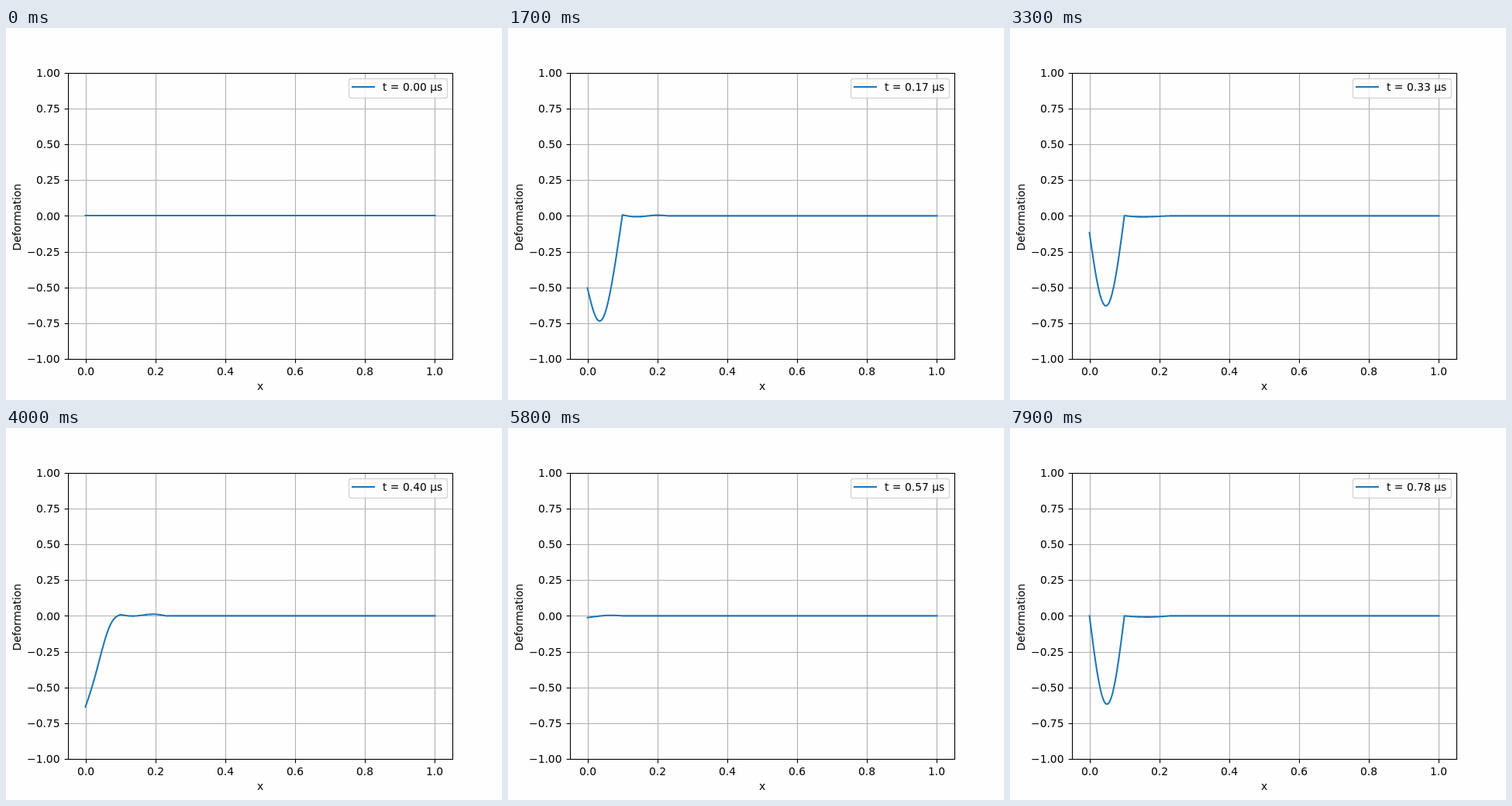
An HTML page with a canvas that plays this animation: 640 by 480 pixels, repeating every 8000 ms.

```html
<!DOCTYPE html>
<html lang="en">
<head>
<meta charset="utf-8">
<title>Deformation over time</title>
<style>
html, body { margin: 0; width: 100%; height: 100%; overflow: hidden; background: #fefefe; }
canvas { display: block; }
</style>
</head>
<body>
<canvas id="plot" width="640" height="480"></canvas>
<script>
const ctx = document.getElementById('plot').getContext('2d');
const STEP_MS = 100, STEPS = 80, STEP_US = 0.00989;
const BLUE = '#1f77b4', GRID = '#b0b0b0', INK = '#000', PAPER = '#fefefe';
const LEFT = 80, RIGHT = 576, TOP = 57.6, BOTTOM = 427.2;
const FONT = '13.89px "DejaVu Sans", Verdana, sans-serif';
const LAYER_1 = 0.1, LAYER_2 = 0.23;

const px = x => 102.545 + 450.91 * x;
const py = y => 242.4 - 184.8 * y;
const crisp = v => Math.floor(v + 0.5) + 0.5;
const rad = deg => deg * Math.PI / 180;

// A steady standing wave plus a transient that swings the free end and dies out.
function shapeAt(n) {
  const fade = (1 - Math.exp(-n / 8)) / (1 + Math.exp((n - 48) / 2.5));
  const swing = rad(60.3 * n);
  const end = 0.7 * fade * Math.sin(swing);
  const rise = 1 - Math.exp(-n / 3);
  const mode = 0.74 * rise * Math.sin(rad(40.2 * n + 7.8)) - 0.15 * fade * Math.cos(swing);
  const edge = -0.013 * end;

  return x => {
    if (x >= LAYER_2) return 0;
    if (x <= LAYER_1) {
      const q = x / LAYER_1, a = Math.PI * q;
      return end * (1 - q) + edge * q + mode * Math.sin(a) + 0.06 * end * Math.sin(2 * a);
    }
    const p = (x - LAYER_1) / (LAYER_2 - LAYER_1), a = Math.PI * p;
    return edge * (1 - p) + 0.013 * (mode * Math.sin(a) + end * Math.sin(2 * a));
  };
}

function line(x1, y1, x2, y2, color, width) {
  ctx.strokeStyle = color;
  ctx.lineWidth = width;
  ctx.beginPath();
  ctx.moveTo(x1, y1);
  ctx.lineTo(x2, y2);
  ctx.stroke();
}

// Text starts on whole pixels so that its glyphs stay sharp.
function text(str, x, y, align = 0) {
  const left = x - align * Math.round(ctx.measureText(str).width);
  ctx.fillStyle = INK;
  ctx.fillText(str, Math.round(left), Math.round(y));
}

function drawAxes() {
  ctx.lineCap = 'butt';
  for (let i = 0; i <= 5; i++) {
    const v = i / 5, x = crisp(px(v));
    line(x, 58, x, 427, GRID, 1.11);
    line(x, 427.5, x, 432.4, INK, 1.11);
    text(v.toFixed(1), px(v), 448, 0.5);
  }
  for (let i = -4; i <= 4; i++) {
    const v = i / 4, y = crisp(py(v));
    line(80, y, 576, y, GRID, 1.11);
    line(75.6, y, 80.5, y, INK, 1.11);
    text((v < 0 ? '\u2212' : '') + Math.abs(v).toFixed(2), 70.3, py(v) + 5.2, 1);
  }
  text('x', 328, 467, 0.5);
  ctx.save();
  ctx.translate(19, 244.5);
  ctx.rotate(-Math.PI / 2);
  text('Deformation', 0, 0, 0.5);
  ctx.restore();
}

function drawCurve(n) {
  const shape = shapeAt(n);
  ctx.save();
  ctx.beginPath();
  ctx.rect(LEFT, TOP, RIGHT - LEFT, BOTTOM - TOP);
  ctx.clip();
  ctx.strokeStyle = BLUE;
  ctx.lineWidth = 2.08;
  ctx.lineCap = 'square';
  ctx.lineJoin = 'round';
  ctx.beginPath();
  for (let i = 0; i <= 500; i++) {
    const x = i / 500;
    ctx.lineTo(px(x), n ? py(shape(x)) : 242);
  }
  ctx.stroke();
  ctx.restore();
}

function drawFrame() {
  ctx.lineCap = 'square';
  ctx.strokeStyle = INK;
  ctx.lineWidth = 1.11;
  ctx.strokeRect(80.5, 58.5, 496, 369);
}

function drawLegend(n) {
  ctx.beginPath();
  ctx.roundRect(442.5, 65.5, 127, 25, 2.8);
  ctx.fillStyle = 'rgba(254,254,254,0.8)';
  ctx.fill();
  ctx.strokeStyle = 'rgba(204,204,204,0.8)';
  ctx.lineWidth = 1.39;
  ctx.stroke();
  line(447, 76, 475, 76, BLUE, 2.08);
  text('t = ' + (n * STEP_US).toFixed(2) + ' \u00b5s', 486, 81);
}

function draw() {
  const n = Math.floor(performance.now() / STEP_MS) % STEPS;
  ctx.fillStyle = PAPER;
  ctx.fillRect(0, 0, 640, 480);
  ctx.font = FONT;
  drawAxes();
  drawCurve(n);
  drawFrame();
  drawLegend(n);
  requestAnimationFrame(draw);
}
draw();
</script>
</body>
</html>
```
